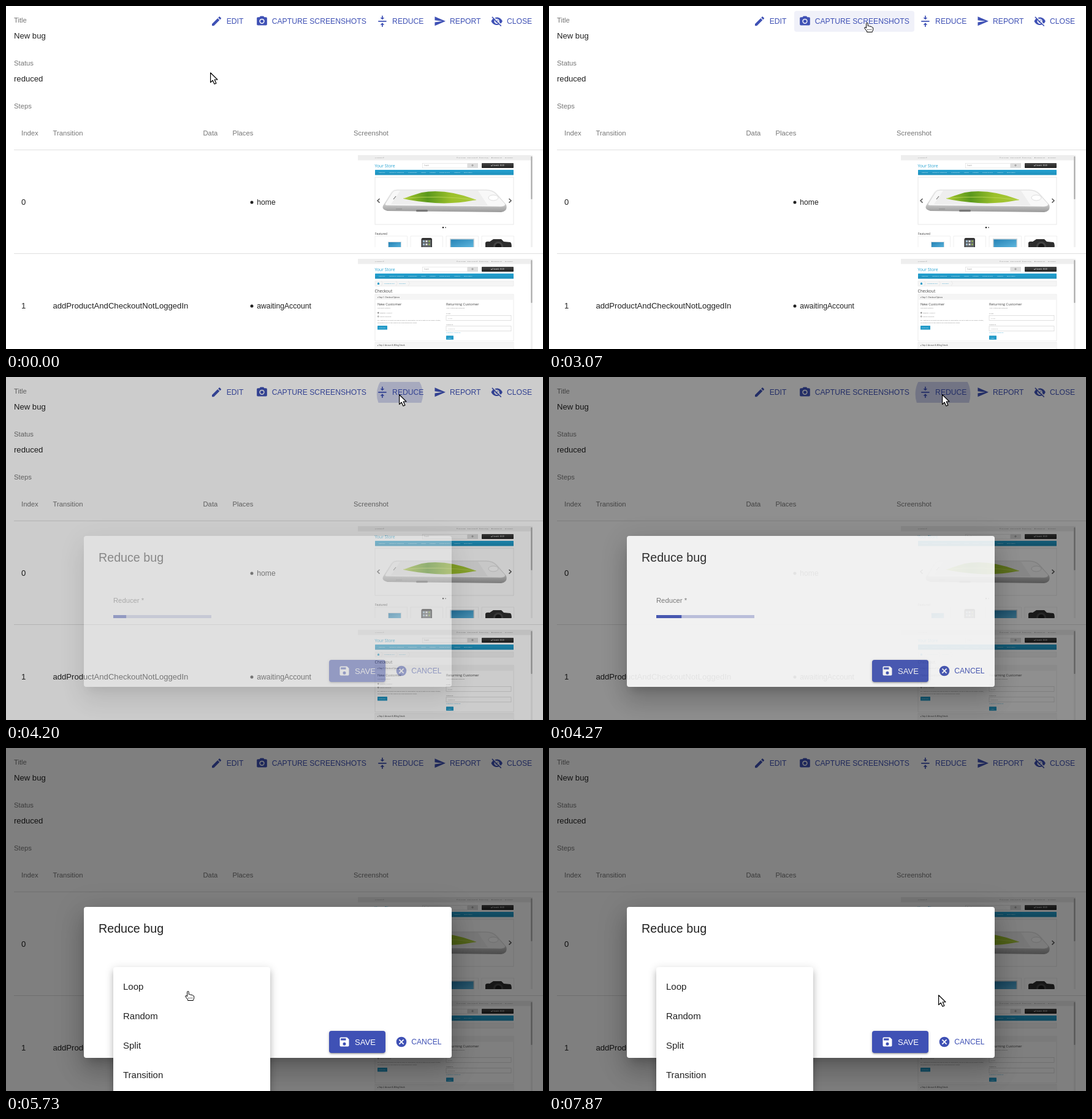
Recreate the animation shown at these times as an HTML page. Size 876x559 px, loop 8000 ms.

```html
<!DOCTYPE html>
<html lang="en">
<head>
<meta charset="utf-8">
<title>Reduce bug</title>
<style>
html, body { margin: 0; width: 100%; height: 100%; overflow: hidden; background: #fff; }
#stage { position: absolute; left: 0; top: 0; width: 876px; height: 559px; overflow: hidden; }
#stage > * { position: absolute; left: 0; top: 0; }
svg { display: block; }
text { font-family: "Liberation Sans", Arial, sans-serif; white-space: pre; }
.shop text { font-family: "Open Sans", sans-serif; }
#shade { width: 876px; height: 559px; background: #000; }
#dialog, #menu { background: #fff; border-radius: 4px; }
#dialog, #menu, #save { position: absolute; }
#stage > #dialog { left: 127px; top: 259px; width: 600px; height: 246px;
  box-shadow: 0 11px 15px -7px rgba(0,0,0,.2), 0 24px 38px 3px rgba(0,0,0,.14), 0 9px 46px 8px rgba(0,0,0,.12); }
#stage > #menu { left: 175px; top: 357px; width: 256px; height: 208px; transform-origin: 50% 33px;
  box-shadow: 0 5px 5px -3px rgba(0,0,0,.2), 0 8px 10px 1px rgba(0,0,0,.14), 0 3px 14px 2px rgba(0,0,0,.12); }
#save { left: 400px; top: 202px; width: 92px; height: 36px; border-radius: 4px; background: #3f51b5;
  box-shadow: 0 1px 5px rgba(0,0,0,.2), 0 2px 2px rgba(0,0,0,.14), 0 3px 1px -2px rgba(0,0,0,.12); }
#dialog svg, #menu svg { position: absolute; left: 0; top: 0; }
</style>
</head>
<body>
<div id="stage"></div>
<script>
const BLUE = '#3f51b5', DARK = 'rgba(0,0,0,.87)', GREY = 'rgba(0,0,0,.54)', SHOP = '#229ac8';
const BODY = 13.125, SMALL = 12.1875, LABEL = 11.25;

const ICONS = {
  edit: 'M3 17.25V21h3.75L17.81 9.94l-3.75-3.75zM20.71 7.04c.39-.39.39-1.02 0-1.41l-2.34-2.34c-.39-.39-1.02-.39-1.41 0l-1.83 1.83 3.75 3.75z',
  camera: 'M12 8.8a3.2 3.2 0 1 0 0 6.4a3.2 3.2 0 1 0 0-6.4zM9 2L7.17 4H4c-1.1 0-2 .9-2 2v12c0 1.1.9 2 2 2h16c1.1 0 2-.9 2-2V6c0-1.1-.9-2-2-2h-3.17L15 2zm3 15a5 5 0 1 1 0-10a5 5 0 1 1 0 10z',
  reduce: 'M8 19h3v4h2v-4h3l-4-4zm8-14h-3V1h-2v4H8l4 4zM4 11v2h16v-2z',
  send: 'M2.01 21L23 12 2.01 3 2 10l15 2-15 2z',
  hide: 'M12 7a5 5 0 0 1 4.64 6.83l2.92 2.92c1.51-1.26 2.7-2.89 3.43-4.75-1.73-4.39-6-7.5-11-7.5-1.4 0-2.74.25-3.98.7l2.16 2.16C10.74 7.13 11.35 7 12 7zM2 4.27l2.74 2.74C3.08 8.3 1.78 10.02 1 12c1.73 4.39 6 7.5 11 7.5 1.55 0 3.03-.3 4.38-.84L19.73 22 21 20.73 3.27 3zM7.53 9.8l1.55 1.55A3 3 0 0 0 12.65 14.92l1.55 1.55A5 5 0 0 1 7.53 9.8zm4.31-.78l3.15 3.15.02-.16a3 3 0 0 0-3.17-2.99z',
  save: 'M17 3H5a2 2 0 0 0-2 2v14a2 2 0 0 0 2 2h14a2 2 0 0 0 2-2V7zm-5 16a3 3 0 1 1 0-6a3 3 0 1 1 0 6zm3-10H5V5h10z',
  cancel: 'M12 2a10 10 0 1 0 0 20a10 10 0 1 0 0-20zm5 13.59L15.59 17 12 13.41 8.41 17 7 15.59 10.59 12 7 8.41 8.41 7 12 10.59 15.59 7 17 8.41 13.41 12z'
};

const text = (x, y, s, size, fill = DARK, more = '') =>
  `<text x="${x}" y="${y}" font-size="${size}" fill="${fill}" ${more}>${s}</text>`;
const rect = (x, y, w, h, fill, more = '') =>
  `<rect x="${x}" y="${y}" width="${w}" height="${h}" fill="${fill}" ${more}/>`;
const path = (d, fill, more = '') => `<path d="${d}" fill="${fill}" ${more}/>`;
const icon = (name, x, y, fill = BLUE) =>
  path(ICONS[name], fill, `fill-rule="evenodd" transform="translate(${x} ${y}) scale(${20 / 24})"`);
const svg = (w, h, inner, more = '') =>
  `<svg width="${w}" height="${h}" viewBox="0 0 ${w} ${h}" ${more}>${inner}</svg>`;

// Shop page header, shared by both thumbnails
function shopHead() {
  const nav = [[608, 'Desktops'], [625, 'Laptops &amp; Notebooks'], [656, 'Components'], [677, 'Tablets'],
    [691, 'Software'], [707, 'Phones &amp; PDAs'], [731, 'Cameras'], [747, 'MP3 Players']];
  const links = [[735, '✆ Call us now'], [753, '● My Account ▾'], [772, '♥ Wish List (0)'],
    [792, '■ Shopping Cart'], [814, '➦ Checkout']];
  return rect(574, 243, 285, 150, '#fff') + rect(574, 243, 282, 8.5, '#eee') +
    rect(856, 243, 3, 150, '#f0f0f0') + rect(856.3, 245, 2.2, 70, '#adadad', 'rx="1"') +
    text(602, 248, '$ Currency ▾', 2.5, '#777') +
    links.map(([x, s]) => text(x, 248, s, 2.3, '#777')).join('') +
    text(601.5, 262.5, 'Your Store', 6.8, '#23a1d1') +
    rect(679.5, 256.5, 73, 7.5, '#fff', 'stroke="#ddd" stroke-width=".6"') + text(682, 261.3, 'Search', 2.6, '#999') +
    rect(753, 256, 17, 8, '#ddd') +
    '<circle cx="761" cy="259.7" r="1.1" fill="none" stroke="#666" stroke-width=".6"/>' +
    rect(776, 256, 52, 8, 'url(#cart)', 'rx=".8"') +
    text(802, 261, '■ 0 item(s) - $0.00', 2.6, '#fff', 'text-anchor="middle"') +
    rect(602, 267, 226, 8.5, 'url(#nav)', 'rx=".6"') +
    nav.map(([x, s]) => text(x, 272.2, s, 2.4, '#fff')).join('');
}

function homePage() {
  const cards = [602, 660, 718, 776].map(x =>
    rect(x, 375, 52.5, 30, '#fff', 'stroke="#e4e4e4" stroke-width=".6"')).join('');
  return shopHead() +
    rect(602, 279, 226, 77, '#fff', 'stroke="#e2e2e2" stroke-width=".8"') +
    path('M637 299H783Q795 299 801 306L816 324Q819 334 808 336L622 334Q611 331 616 324L628 304Q631 299 637 299z', 'url(#metal)') +
    path('M638 300H783Q793 300 799 306L814 322Q816 326 808 327L622 325Q616 325 620 320L630 304Q633 300 638 300z', '#f8f8f8', 'stroke="#ccc" stroke-width=".6"') +
    path('M643 301H770L786 325 628 323z', '#eee') +
    path('M648 314Q664 308 678 304Q718 297 767 316Q733 323 700 321Q670 319 648 314z', 'url(#leaf)') +
    path('M648 313.5Q705 308 767 316', 'none', 'stroke="#bfd95a" stroke-width=".8"') +
    path('M632 315L636 310', 'none', 'stroke="#777" stroke-width="1.2"') +
    '<ellipse cx="795" cy="312.5" rx="8" ry="4.5" fill="#fff" stroke="#ddd"/>' +
    rect(669, 332, 19, 3.2, '#777', 'rx="1.5"') + rect(636, 330, 10, 1.5, '#999') +
    path('M609.5 314L606 317.3L609.5 320.6M820.5 314L824 317.3L820.5 320.6', 'none', 'stroke="#555" stroke-width="1.5"') +
    '<circle cx="713" cy="361" r="1.2" fill="#111"/><circle cx="717" cy="361" r="1.1" fill="#777"/>' +
    text(602, 372.7, 'Featured', 4.8, '#444') + cards +
    rect(623, 384, 22, 12, '#d4dce2') + rect(624, 385, 20, 12, 'url(#screen)') +
    rect(677.5, 378, 17.5, 20, '#333', 'rx="2.5"') + rect(679, 381, 14.5, 14, '#5f6468') +
    [0, 1, 2, 3, 4, 5].map(i => rect(680 + i % 3 * 4.5, 382 + (i > 2) * 5, 3, 3, ['#9db8cc', '#d9d9d9', '#8ba35d'][i % 3])).join('') +
    rect(724, 379, 40, 16, '#cfd6da') + rect(725.5, 380.5, 37, 14, 'url(#screen)') +
    path('M782 396V386Q783 383 789 384L795 380H808L812 384 823 385Q826 388 824 396z', '#2d2d2d') +
    '<circle cx="803" cy="392" r="8" fill="#444"/><circle cx="803" cy="392" r="5" fill="#181818"/>';
}

function checkoutPage() {
  const panel = (y, h, s) =>
    rect(602, y, 226, h, '#fff', 'stroke="#ddd" stroke-width=".6"') +
    rect(602.3, y + .3, 225.4, 8.5, '#f5f5f5') + text(606, y + 5.6, s, 2.9, '#333');
  const tiny = (x, y, s, fill = '#666') => text(x, y, s, 2.5, fill);
  const field = (y, s) => rect(718, y, 106, 8, '#fff', 'stroke="#ccc" stroke-width=".6"') + tiny(721, y + 5, s, '#999');
  const button = (x, y, w, s) => rect(x, y, w, 6.5, SHOP, 'rx=".6"') + tiny(x + 2, y + 4.2, s, '#fff');
  const radio = y => `<circle cx="607.3" cy="${y}" r="1" fill="#fff" stroke="#666" stroke-width=".6"/>`;
  return `<g transform="translate(0 169)">${shopHead()}</g>` +
    rect(602, 448, 226, 8.5, '#f5f5f5', 'stroke="#e3e3e3" stroke-width=".5"') +
    path('M605.5 452.3L607.5 450.3L609.5 452.3H609V454H606V452.3z', SHOP) +
    tiny(617, 453.2, 'Shopping Cart', SHOP) + tiny(641, 453.2, 'Checkout', SHOP) +
    path('M612 448L614.5 452L612 456M636 448L638.5 452L636 456M656 448L658.5 452L656 456', 'none', 'stroke="#ddd" stroke-width=".5"') +
    text(601.5, 467, 'Checkout', 6.6, '#444') +
    panel(470, 76, '▾ Step 1: Checkout Options') +
    text(606, 488.3, 'New Customer', 5.7, '#444') + text(718, 488.3, 'Returning Customer', 5.7, '#444') +
    tiny(606, 493.3, 'Checkout Options:') + tiny(718, 493.3, 'I am a returning customer') +
    radio(500) + '<circle cx="607.3" cy="500" r=".6" fill="#333"/>' + tiny(610, 501, 'Register Account') +
    radio(506) + tiny(610, 507, 'Guest Checkout') +
    tiny(606, 513, 'By creating an account you will be able to shop faster, be up to date on an order\'s status,') +
    tiny(606, 517, 'and keep track of the orders you have previously made.') +
    button(606, 521, 16, 'Continue') +
    tiny(718, 502.3, 'E-Mail') + field(504.5, 'E-Mail') + tiny(718, 519.8, 'Password') + field(521.8, 'Password') +
    tiny(718, 532.8, 'Forgotten Password', SHOP) + button(718, 537.3, 12, 'Login') +
    panel(548.5, 20, '▸ Step 2: Account &amp; Billing Details');
}

const gradient = (id, stops, dir = 'x2="0" y2="1"') => `<linearGradient id="${id}" x1="0" y1="0" ${dir}>` +
  stops.map((c, i) => `<stop offset="${i / (stops.length - 1)}" stop-color="${c}"/>`).join('') + '</linearGradient>';
const thumb = (y, inner) =>
  `<svg class="shop" x="574" y="${y}" width="285" height="150" viewBox="574 ${y} 285 150" overflow="hidden">${inner}</svg>`;

const BUTTONS = [['edit', 326, 'EDIT', 70], ['camera', 400, 'CAPTURE SCREENSHOTS', 196],
  ['reduce', 596.4, 'REDUCE', 93.6], ['send', 690.3, 'REPORT', 92], ['hide', 783.2, 'CLOSE', 83]];

const page = '<defs>' + gradient('cart', ['#444', '#222']) + gradient('nav', ['#23a1d1', '#1f90bb']) +
  gradient('metal', ['#f4f4f4', '#e0e0e0', '#999']) + gradient('screen', ['#2583b6', '#61b8df'], 'x2="1" y2="1"') +
  gradient('leaf', ['#a9c92c', '#5a981c', '#9dc12b', '#a8c83a'], 'x2="1" y2="0"') +
  '<clipPath id="hit"><rect x="596" y="8" width="94" height="34" rx="4"/></clipPath></defs>' +
  BUTTONS.map(([, x, , w]) => rect(x, 8, w, 34, BLUE, 'class="hover" rx="4" opacity="0"')).join('') +
  `<g clip-path="url(#hit)"><circle id="ripple" cx="642.5" cy="28" fill="${BLUE}"/></g>` +
  BUTTONS.map(([name, x, s]) => icon(name, x + 7.5, 14.8) + text(x + 33.7, 29, s, SMALL, BLUE)).join('') +
  [[13, 27, 'Title'], [13, 97, 'Status'], [13, 167, 'Steps'], [25, 211, 'Index'], [76.5, 211, 'Transition'],
    [321.5, 211, 'Data'], [369.5, 211, 'Places'], [567, 211, 'Screenshot']]
    .map(([x, y, s]) => text(x, y, s, LABEL, GREY)).join('') +
  [[13, 53, 'New bug'], [13, 123, 'reduced'], [25, 324, '0'], [25, 493, '1'],
    [76.5, 493, 'addProductAndCheckoutNotLoggedIn']].map(([x, y, s]) => text(x, y, s, BODY)).join('') +
  [[320, 'home'], [489, 'awaitingAccount']].map(([y, s]) =>
    `<circle cx="401" cy="${y}" r="2.5" fill="#222"/>` + text(409.3, y + 4, s, SMALL)).join('') +
  rect(13, 234, 863, 1, '#e0e0e0') + rect(13, 403, 863, 1, '#e0e0e0') +
  thumb(243, homePage()) + thumb(412, checkoutPage());

const dialog = '<div id="save"></div>' + svg(600, 246,
  text(24, 42, 'Reduce bug', 19.6875) +
  text(0, 0, 'Reducer *', 15, GREY, 'id="label"') +
  `<g id="loading">${rect(48, 129, 160, 5, '#c0c5e5')}${rect(48, 129, 0, 5, BLUE, 'id="bar"')}</g>` +
  `<g id="select">${path('M287 128h10l-5 5z', GREY)}${rect(48, 144, 256, 1, 'rgba(0,0,0,.42)', 'id="line"')}</g>` +
  icon('save', 415, 210, '#fff') + text(442, 224.5, 'SAVE', BODY, '#fff') +
  icon('cancel', 508, 210) + text(534.2, 224, 'CANCEL', SMALL, BLUE));

const menu = svg(256, 208, ['Loop', 'Random', 'Split', 'Transition'].map((s, i) =>
  rect(0, 8 + i * 48, 256, 48, '#ebebeb', 'class="row"') + text(16, 37 + i * 48, s, 15)).join(''));

const outline = 'stroke="#000" stroke-linejoin="round"';
const cursor = `<g id="arrow">${path('M.6 .8V16.6L4.2 13.2L7 19.2L9.9 17.9L7.2 12H12z', '#fff', outline + ' stroke-width="1.2"')}</g>` +
  `<g id="hand">${path('M3.6 1.8a1.3 1.3 0 0 1 2.6 0V5.6q1.6-.6 2.4.5q1.6-.5 2.4.6q1.7-.4 2.2.9q1.5 0 1.5 1.6V11.2q0 2-1.3 3.1V15.5H4.6V14L.8 9.4Q.3 7.6 2 7.6L3.6 9z', '#fff', outline)}` +
  path('M5 11.5h8', 'none', 'stroke="#000" stroke-dasharray="1 1"') + '</g>';

const $ = id => document.getElementById(id);
$('stage').innerHTML = svg(876, 559, page) + '<div id="shade"></div>' + `<div id="dialog">${dialog}</div>` +
  `<div id="menu">${menu}</div>` + svg(16, 21, cursor, 'id="cursor"');
const hovers = document.querySelectorAll('.hover'), rows = document.querySelectorAll('.row');

// Pointer path: time, x, y
const PATH = [[0, 333, 108], [267, 334, 107], [667, 354, 65], [1067, 377, 17], [1467, 377, 17], [1533, 387, 26],
  [1667, 492, 27], [2000, 492, 27], [2067, 496, 27], [3000, 496, 27], [3533, 641, 28], [4267, 641, 28],
  [4533, 640, 61], [4600, 640, 61], [4933, 335, 369], [5000, 335, 369], [5200, 295, 390], [5667, 295, 390],
  [6133, 275, 432], [6467, 275, 432], [6533, 253, 541], [6800, 253, 541], [6867, 252, 541], [7067, 252, 541],
  [7133, 300, 388], [7333, 300, 388], [7533, 440, 432], [7667, 560, 464], [7867, 635, 402], [8000, 635, 402]];

const clamp = v => Math.max(0, Math.min(1, v));
const within = (t, a, b) => t >= a - 5 && t < b - 5;
const show = (el, on) => el.setAttribute('visibility', on ? 'visible' : 'hidden');

// cubic-bezier(.4, 0, .2, 1)
function ease(x) {
  x = clamp(x);
  let lo = 0, hi = 1;
  for (let i = 0; i < 24; i++) {
    const s = (lo + hi) / 2, r = 1 - s;
    if (1.2 * r * r * s + .6 * r * s * s + s * s * s < x) lo = s; else hi = s;
  }
  return lo * lo * (3 - 2 * lo);
}

function pointer(t) {
  const i = Math.max(1, PATH.findIndex(p => p[0] >= t - 1));
  const [t0, x0, y0] = PATH[i - 1], [t1, x1, y1] = PATH[i], k = clamp((t - t0) / (t1 - t0));
  return [Math.round(x0 + (x1 - x0) * k), Math.round(y0 + (y1 - y0) * k)];
}

function draw(ms) {
  const t = Math.floor((ms + 5) * .015) / .015;   // 15 steps a second

  const spans = [[933, 1600], [1600, 3200], [3333, 4133]];
  hovers.forEach((h, i) => {
    const [a, b] = spans[i] || [0, 0];
    h.setAttribute('opacity', within(t, a, b) ? .08 : 0);
  });
  const grow = ease((t - 3945) / 550);
  $('ripple').setAttribute('r', 52 * grow);
  $('ripple').setAttribute('opacity', (.1 + .2 * grow) * (1 - clamp((t - 4270) / 240)));

  const open = ease((t - 4130) / 225);
  $('shade').style.opacity = open / 2;
  $('dialog').style.opacity = open;

  const loaded = t > 4395, run = clamp((t - 4130) / 1260 * 1.25);
  show($('loading'), !loaded);
  show($('select'), loaded);
  $('bar').setAttribute('width', Math.min(160, 160 * 1.9 * run));

  const pop = ease((t - 5400) / 260), up = loaded ? pop : 1;
  $('label').setAttribute('transform', `translate(48 ${136 - 27 * up}) scale(${1 - up / 4})`);
  const over = t > 5060;
  $('line').setAttribute('height', over ? 2 : 1);
  $('line').setAttribute('fill', over ? DARK : 'rgba(0,0,0,.42)');

  $('menu').style.opacity = pop;
  $('menu').style.transform = pop < 1 ? `scale(${.75 + pop / 4}, ${.5625 + pop * .4375})` : 'none';
  rows.forEach((r, i) => show(r, i === 3 && within(t, 6533, 7133) || i === 0 && within(t, 7400, 7467) ||
    i === 1 && within(t, 7467, 7533)));

  const [x, y] = pointer(t);
  $('cursor').style.transform = `translate(${x}px, ${y}px)`;
  const hand = [[933, 3467], [5067, 7533]].some(([a, b]) => within(t, a, b));
  show($('hand'), hand);
  show($('arrow'), !hand);
}

function tick() {
  draw(performance.now() % 8000);
  requestAnimationFrame(tick);
}
tick();
</script>
</body>
</html>
```
